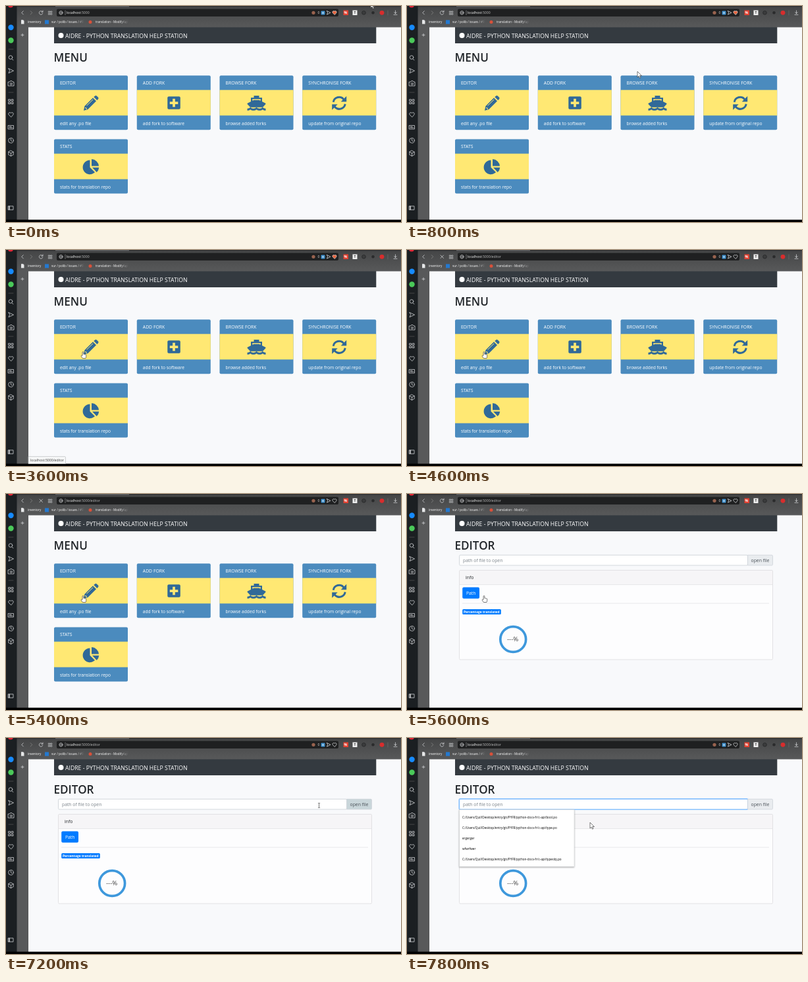
Recreate the animation shown at these times as an HTML page. Size 600x330 px, loop 8000 ms.

```html
<!DOCTYPE html>
<html lang="en">
<head>
<meta charset="utf-8">
<title>Translation help station</title>
<style>
  html, body { margin: 0; width: 100%; height: 100%; overflow: hidden; background: #f8f9fb; }
  svg { display: block; width: 600px; height: 330px; }
  text { font-family: "Open Sans", "Noto Sans", sans-serif; white-space: pre; }
  .line { fill: none; stroke: #d8dadc; stroke-width: .75; stroke-linecap: round; stroke-linejoin: round; }
  .icon { fill: #306998; }
  .gap { fill: none; stroke: #ffe873; }
</style>
</head>
<body>
<svg viewBox="0 0 600 330">
  <defs>
    <linearGradient id="fade"><stop offset=".75" stop-color="#545556" stop-opacity="0"/><stop offset="1" stop-color="#545556"/></linearGradient>
    <linearGradient id="chrome" x2="0" y2="1"><stop stop-color="#444546"/><stop offset="1" stop-color="#58595a"/></linearGradient>
    <filter id="shadow" x="-5%" y="-5%" width="110%" height="115%"><feDropShadow dx="0" dy="1" stdDeviation="1" flood-opacity=".35"/></filter>
  </defs>
  <rect width="600" height="330" fill="#f8f9fb"/>

  <g id="menu"></g>

  <g id="editor">
    <rect id="glow" x="78.3" y="92" width="440.4" height="18" rx="2.5" fill="#a5d0ff"/>
    <rect id="field" x="79.5" y="93.3" width="438" height="15.7" rx="1.5" fill="#fff" stroke-width=".9"/>
    <path id="open" d="M517.5 93.3H554q1.5 0 1.5 1.5v12.7q0 1.5-1.5 1.5h-36.5z" stroke="#ced4da" stroke-width=".8"/>
    <rect x="79.5" y="116.5" width="476" height="136.5" rx="1.5" fill="#fdfdfe" stroke="#dfdfe1" stroke-width=".9"/>
    <path d="M80 117h475v21.5H80z" fill="#f6f5f7"/>
    <path d="M80 138.5h475M84 167h466" stroke="#e3e3e5" stroke-width=".8"/>
    <rect x="84.200" y="142.600" width="25.800" height="17.200" rx="2" fill="#007bff"/>
    <rect x="84.200" y="176" width="58.600" height="8" rx="1.500" fill="#007bff"/>
    <circle cx="161.200" cy="222" r="19.400" fill="none" stroke="#3e98dc" stroke-width="3.700"/>
  </g>

  <g id="suggestions">
    <rect x="79.500" y="109.500" width="174.500" height="87" fill="#fff" stroke="#c4c7ca" stroke-width=".5" filter="url(#shadow)"/>
  </g>

  <g id="page-bar">
    <rect x="73" y="32" width="489.300" height="25" fill="#343a40"/>
    <circle cx="83.500" cy="45" r="4" fill="#fff"/>
  </g>

  <g id="browser">
    <rect width="600" height="32.500" fill="url(#chrome)"/>
    <rect width="600" height="1.300" fill="#2c2d2e"/>
    <rect x="75" width="112" height="1.300" fill="#606264"/>
    <rect x="16" y="32" width="18" height="298" fill="#58595a"/>
    <rect width="16.500" height="330" fill="#1b1f22"/>
    <rect x="77" y="4.500" width="428" height="11.500" rx="2" fill="#1f2021"/>
    <rect y="326.500" width="600" height="3.500" fill="#000"/>
    <circle cx="7" cy="-1.500" r="4" fill="#e32636"/>
    <circle cx="7.500" cy="32.700" r="4.200" fill="#168aff"/>
    <circle cx="7.500" cy="52.500" r="4.200" fill="#4ac959"/>
    <g class="line">
      <path d="M4 66h7M4 132h7" stroke="#555"/>
      <circle cx="7" cy="78.500" r="2.800"/><path d="M9 80.800l2 2"/>
      <path d="M4 95.500l7.500 3.500-7.500 3.500 1.500-3.500z"/>
      <path d="M3.500 116h2l1-1.500h2.500l1 1.500h2v6h-8.500z"/><circle cx="7.700" cy="119" r="1.500"/>
      <path d="M4 142.700h2.500v2.500H4zM8.500 142.700H11v2.500H8.500zM4 147h2.500v2.500H4zM8.500 147H11v2.500H8.500z"/>
      <path d="M7.500 169.500l-3.300-3.300a2 2 0 0 1 3.300-2.700 2 2 0 0 1 3.300 2.700z"/>
      <path d="M3.500 182.500h8v5.500h-8zM5 184.500h3M5 186h5"/>
      <circle cx="7.500" cy="205.500" r="3.800"/><path d="M7.500 203v2.700l1.600 1"/>
      <path d="M7.500 221l3.700 2v4.300l-3.700 2-3.700-2V223zM3.800 223l3.700 2 3.700-2M7.500 225v4.200"/>
      <path d="M3.500 305.800h7.500v5.500h-7.500zM4.500 306v5M5.500 306v5"/>
      <path d="M23 44.300h4M25 42.300v4"/>
      <path d="M26.300 7.700l-2.600 2.600 2.600 2.600"/>
      <path d="M37.200 7.700l2.600 2.600-2.600 2.600" stroke="#888"/>
      <path id="reload" d="M55.600 9a2.800 2.800 0 1 0 .2 2.300M56 7v2.200h-2.200"/>
      <path id="stop" d="M51 8l4.500 4.500M55.500 8L51 12.500"/>
      <path d="M64.700 8h1.800v1.800h-1.800zM68 8h1.800v1.800H68zM64.700 11.300h1.800v1.800h-1.800zM68 11.300h1.800v1.800H68z" stroke-width=".6"/>
      <circle cx="83.500" cy="10.300" r="2.700" stroke-width=".6"/><ellipse cx="83.500" cy="10.300" rx="1.200" ry="2.700" stroke-width=".4"/><path d="M81 10.300h5" stroke-width=".4"/>
      <path d="M90 7v6.500" stroke="#aaa" stroke-width=".6"/>
      <path d="M487.500 7.500l5.500 2.800-5.500 2.800 1-2.800z"/>
      <path id="heart" d="M499 13.300l-2.700-2.700a1.700 1.700 0 0 1 2.700-2.400 1.700 1.700 0 0 1 2.700 2.400z"/>
      <path d="M591.500 7v4.500m-1.800-1.800l1.800 1.800 1.800-1.800M589 13.300h5"/>
      <path d="M580 7v7" stroke="#777" stroke-width=".6"/>
    </g>
    <circle cx="467" cy="10.300" r="2.600" fill="#99634f"/>
    <rect x="478.500" y="7.500" width="6" height="6" rx="1" fill="#398bc9"/>
    <path d="M480 9l3 3m0-3l-3 3" stroke="#fff" stroke-width=".8"/>
    <rect x="512.500" y="6.500" width="7.500" height="7.500" fill="#e24232"/>
    <rect x="526.500" y="6.500" width="7" height="7.500" fill="#eee"/>
    <circle cx="543.500" cy="10.300" r="2.800" fill="#3b3c3d" stroke="#2a2b2c"/>
    <circle cx="557.500" cy="10.300" r="2.200" fill="#2a2b2c"/>
    <circle cx="571" cy="10.300" r="3.400" fill="#d82d2d"/>
    <path d="M23 21.300h3l1.500 1.500v4.700H23z" fill="#e6e7e8"/>
    <rect x="59" y="21.500" width="6" height="6" fill="#2479d0"/>
    <circle cx="128" cy="24.500" r="2.500" fill="#d8503a"/>
  </g>

  <g id="status">
    <path d="M34 315.500h55q1.500 0 1.500 1.500v9.500H34z" fill="#f5f6f6" stroke="#c1c3c5" stroke-width=".7"/>
  </g>

  <g id="cursor" stroke="#333" stroke-width=".65" stroke-linejoin="round">
    <path id="arrow" d="M0 0V9l2.100-1.900 1.400 3.100 1.500-.7-1.400-3h2.900z" fill="#fff"/>
    <path id="hand" d="M-.9 5.800V.9q0-.9.900-.9t.9.900V3.800q.8-.5 1.400.1.700-.4 1.300.3 1.100-.2 1.100.9v2.200q0 1.400-.8 2.700H-.6L-2.800 6.800q-.4-1 .6-1.200z" fill="#fff"/>
    <path id="beam" d="M-1.500-3.600q1.500 0 1.500.6 0-.6 1.500-.6M0-3v6M-1.500 3.600Q0 3.600 0 3q0 .6 1.500.6" fill="none"/>
  </g>
</svg>

<script>
const SVG = "http://www.w3.org/2000/svg";
const $ = id => document.getElementById(id);

function add(parent, tag, attrs) {
  const node = document.createElementNS(SVG, tag);
  for (const key in attrs) node.setAttribute(key, attrs[key]);
  return $(parent).appendChild(node);
}

function label(parent, x, y, size, fill, text, weight = 400) {
  const node = add(parent, "text", { x, y, "font-size": size, fill, "font-weight": weight });
  node.textContent = text;
  return node;
}

const icons = {
  pencil: `<path d="M-11 11.500L-9.600 4.700 3-8 8-3-4.700 9.700zM4.300-9.300L6.300-11.100q1.300-.8 2.500.2L11-8.800q1 1.200.2 2.500L9.300-4.300z"/>
    <path class="gap" d="M-6.500 4L3.200-5.500M-9 7.200l2 .3.400 2.200" stroke-width="1"/>`,
  plus: `<rect x="-9.500" y="-10" width="19.500" height="19.500" rx="2"/>
    <path class="gap" d="M-6-.2H6.500M.2-6.500V6" stroke-width="3.700"/>`,
  ship: `<path d="M-4-11.300h8v3h4.500v6L13.500.2q1 .6.300 1.400L9.500 6.500h-19L-13.800 1.600q-.7-.8.300-1.400L-8.500-2.300v-6H-4z"/>
    <path d="M-14 8.500q2.800 0 4.700-2Q-7.500 8.500-4.700 8.500T0 6.500q2 2 4.700 2t4.600-2q2 2 4.700 2v3q-3 0-4.700-1.500-2 1.500-4.600 1.500T0 10q-2 1.500-4.700 1.500T-9.300 10q-2 1.500-4.700 1.500z"/>
    <path class="gap" d="M-5.500-3.700V-5.300h11v1.600" stroke-width="1.500"/>`,
  sync: `<path d="M-9-1.500A9 9 0 0 1 7-5.500M9 1.500A9 9 0 0 1-7 5.500" fill="none" stroke="#306998" stroke-width="3"/>
    <path d="M11-10.500V-2H2.500zM-11 10.500V2h8.500z"/>`,
  pie: `<path d="M-1.500-10A10.800 10.800 0 1 0 6 8.500L-1.500 1zM1-11.500A11.300 11.300 0 0 1 12-1H1zM2 1.200H12.300A11 11 0 0 1 8.800 8.300z"/>`
};

function card(x, y, title, footer, icon) {
  add("menu", "rect", { x, y, width: 112, height: 83, rx: 2, fill: "#4b8bbe" });
  add("menu", "rect", { x, y: y + 22, width: 112, height: 39, fill: "#ffe873" });
  add("menu", "g", { class: "icon", transform: `translate(${x + 56} ${y + 42})` }).innerHTML = icons[icon];
  label("menu", x + 9, y + 13.5, 6.85, "#fff", title);
  label("menu", x + 9, y + 75.3, 6.7, "#fff", footer);
}

card(73, 106.3, "EDITOR", "edit any .po file", "pencil");
card(198.8, 106.3, "ADD FORK", "add fork to software", "plus");
card(324.5, 106.3, "BROWSE FORK", "browse added forks", "ship");
card(450.2, 106.3, "SYNCHRONISE FORK", "update from original repo", "sync");
card(73, 203.6, "STATS", "stats for translation repo", "pie");
label("menu", 72.5, 85.2, 17.1, "#212529", "MENU", 600);

label("editor", 72.5, 85.2, 17.1, "#212529", "EDITOR", 600);
label("editor", 85, 103.7, 6.8, "#7b838a", "path of file to open");
label("editor", 522.5, 103.7, 6.85, "#495057", "open file");
label("editor", 89, 130, 6.8, "#212529", "info");
label("editor", 90, 154, 6.8, "#fff", "Path");
label("editor", 86, 182, 4.95, "#fff", "Percentage translated", 700);
label("editor", 152, 225.3, 9.7, "#444", "---%");

const folder = "C:/Users/Quil/Desktop/entry/git/PYFR/python-docs-fr/c-api/";
[folder + "bool.po", folder + "type.po", "ergerger", "wfwrfwer", folder + "typeobj.po"]
  .forEach((text, i) => label("suggestions", 84, 123 + i * 15.9, 4.64, "#000", text));

label("page-bar", 90, 48.8, 8.7, "#fff", "AIDRE - PYTHON TRANSLATION HELP STATION");
label("browser", 92, 12.2, 5.15, "#fff", "localhost").insertAdjacentHTML(
  "beforeend", '<tspan fill="#bbb">:5000<tspan id="route">/editor</tspan></tspan>');
label("browser", 473.5, 12.2, 4.8, "#ddd", "0");
label("browser", 513.5, 12.2, 5, "#fff", "%", 700);
label("browser", 528.5, 12.2, 5, "#333", "T", 700);
label("browser", 33, 26.4, 4.6, "#fff", "inventory");
label("browser", 69, 26.4, 4.6, "#fff", "vur / polib / issues / #9");
label("browser", 136, 26.4, 4.6, "#fff", "translation - Modify/up");
add("browser", "rect", { x: 69, y: 20, width: 50, height: 9, fill: "url(#fade)" });
add("browser", "rect", { x: 136, y: 20, width: 50, height: 9, fill: "url(#fade)" });
label("status", 37, 322.7, 5.15, "#444", "localhost:5000/editor");

// time, x, y, pointer shape
const path = [
  [0, 554, -6, "arrow"], [200, 545, 10, "arrow"], [600, 430, 70, "arrow"],
  [1000, 270, 130, "arrow"], [1400, 142, 148, "hand"], [1800, 117, 149.5, "hand"],
  [2200, 117, 155.5, "hand"], [6000, 117, 155.5, "arrow"], [6200, 150, 154, "arrow"],
  [6600, 420, 116, "arrow"], [6800, 522, 103, "hand"], [7000, 528, 102, "hand"],
  [7200, 475.5, 103, "beam"], [7400, 420, 103, "beam"], [7600, 335, 110, "arrow"],
  [7800, 278, 129, "arrow"], [8000, 278, 129, "arrow"]
];

const show = (id, on) => $(id).style.display = on ? "" : "none";

function render(time) {
  const t = Math.floor(time % 8000 / 200) * 200;
  const clicked = t >= 4400, loaded = t >= 5600, focused = t >= 7400;
  const hovered = t >= 6800 && t <= 7200;

  show("menu", !loaded);
  show("editor", loaded);
  show("suggestions", t >= 7600);
  show("route", clicked);
  show("stop", clicked && !loaded);
  show("reload", !clicked || loaded);
  show("glow", focused);
  show("status", t >= 1800 && !clicked);
  $("status").style.opacity = t < 2000 ? .4 : 1;
  $("heart").style.fill = clicked ? "none" : "#e9633b";
  $("field").setAttribute("stroke", focused ? "#6fb4fb" : "#ced4da");
  $("open").setAttribute("fill", hovered ? "#c9d6da" : "#e9ecef");

  const next = path.findIndex(key => key[0] > t);
  const [t0, x0, y0, shape] = path[next - 1], [t1, x1, y1] = path[next];
  const k = (t - t0) / (t1 - t0);
  $("cursor").setAttribute("transform", `translate(${x0 + (x1 - x0) * k} ${y0 + (y1 - y0) * k})`);
  for (const id of ["arrow", "hand", "beam"]) show(id, id === shape);
}

const start = performance.now();
function tick() {
  render(performance.now() - start);
  requestAnimationFrame(tick);
}
tick();
</script>
</body>
</html>
```
